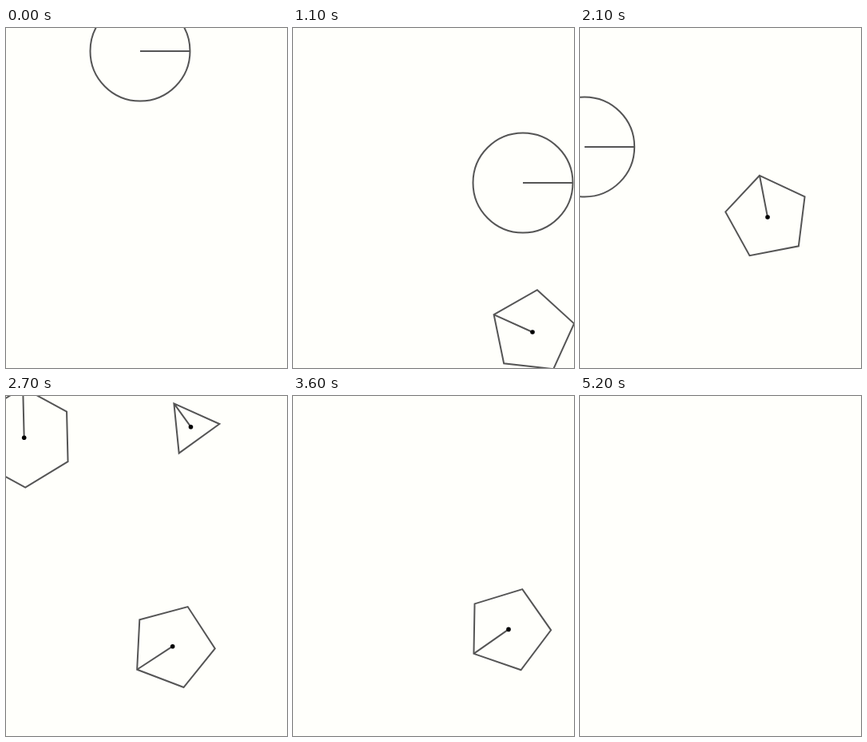
Animation, 352 px wide and 426 px high, one loop 6 s. Source, as an HTML page with a canvas:

```html
<!DOCTYPE html>
<html>
<head>
<meta charset="utf-8">
<title>Bouncing shapes</title>
<style>
html, body { margin: 0; width: 100%; height: 100%; overflow: hidden; background: #fffffb; }
canvas { display: block; }
</style>
</head>
<body>
<canvas width="352" height="426"></canvas>
<script>
const ctx = document.querySelector('canvas').getContext('2d');
const STEP = 100, LOOP = 6000, SIDE = 62.5, GRAVITY = 4.9, WALL = 314;
const FLOOR = 366, CEILING = 53;

// Shapes fly freely between key points. x runs on past the wall, which folds it back.
// A key point with "via" is reached by bouncing off that height halfway.
const key = (time, x, y, angle = 0, via = null) => ({ time, x, y, angle, via });
const shapes = [
  { sides: 0, path: [key(0, 168, 29), key(11, 288, 194, 0, FLOOR), key(24, -79, 231)] },
  { sides: 3, path: [key(23, 245, -38, 200), key(27, 231.5, 38.7, 234.2), key(35, -40, 330, 300)] },
  { sides: 6, path: [key(23, 82.7, -80.6, 264.6), key(33, -67.3, 398.4, 274.6)] },
  { sides: 5, path: [
    key(3, 296, -53, 160),
    key(11, 300, 381, 204.4),
    key(21, 235, 237, 259.1, CEILING),
    key(27, 208.7, 313.7, 146.9, FLOOR),
    key(36, 270, 292.4, 145, FLOOR),
    key(43, 2 * WALL - 187.8, 220.4, 328.8),
    key(52, 700, 467, 565)] }
];

const mix = (a, b, u) => a + (b - a) * u;
const arc = (a, b, span, u) => mix(a, b, u) - GRAVITY / 2 * u * (1 - u) * span * span;

function height(from, to, span, u) {
  if (to.via === null) return arc(from.y, to.y, span, u);
  return u < 0.5
    ? arc(from.y, to.via, span / 2, 2 * u)
    : arc(to.via, to.y, span / 2, 2 * u - 1);
}

function poseAt(path, time) {
  const i = path.findIndex(k => time < k.time);
  if (i < 1) return null;
  const from = path[i - 1], to = path[i];
  const span = to.time - from.time, u = (time - from.time) / span;
  return {
    x: WALL - Math.abs(WALL - mix(from.x, to.x, u)),
    y: height(from, to, span, u),
    angle: mix(from.angle, to.angle, u) * Math.PI / 180
  };
}

function drawShape(sides, { x, y, angle }) {
  const radius = sides ? SIDE / (2 * Math.sin(Math.PI / sides)) : SIDE;
  const corner = k => {
    const a = angle + k * 2 * Math.PI / sides;
    return [x + radius * Math.cos(a), y + radius * Math.sin(a)];
  };
  ctx.beginPath();
  if (sides) {
    for (let k = 0; k < sides; k++) ctx.lineTo(...corner(k));
    ctx.closePath();
  } else {
    ctx.arc(x, y, radius, 0, 2 * Math.PI);
  }
  ctx.moveTo(x, y);
  ctx.lineTo(x + radius * Math.cos(angle), y + radius * Math.sin(angle));
  ctx.stroke();
  if (!sides) return;
  ctx.beginPath();
  ctx.arc(x, y, 2.8, 0, 2 * Math.PI);
  ctx.fillStyle = '#000';
  ctx.fill();
}

const start = performance.now();
ctx.strokeStyle = '#555';
ctx.lineWidth = 2;

function draw() {
  const time = Math.floor((performance.now() - start) % LOOP / STEP);
  ctx.fillStyle = '#fffffb';
  ctx.fillRect(0, 0, 352, 426);
  for (const { sides, path } of shapes) {
    const pose = poseAt(path, time);
    if (pose) drawShape(sides, pose);
  }
  requestAnimationFrame(draw);
}
draw();
</script>
</body>
</html>
```
